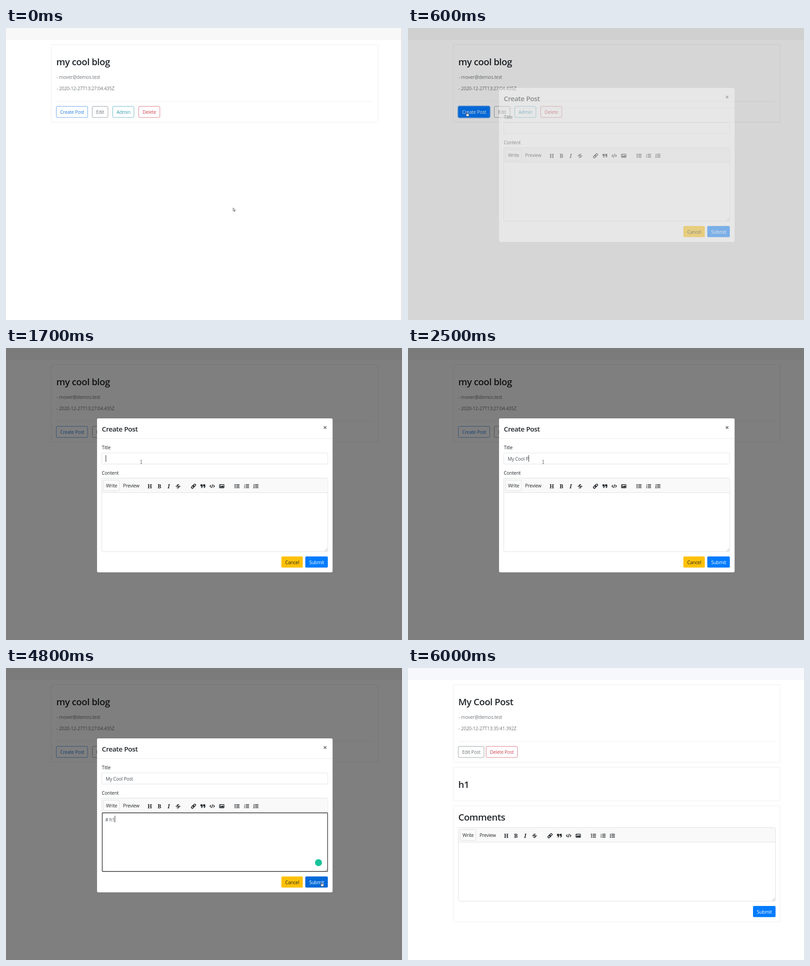
Write an HTML page that moves like this. It is 870x643 px and loops after 6.3 s.

```html
<!DOCTYPE html>
<html lang="en">
<head>
<meta charset="utf-8">
<title>Create a post</title>
<style>
html, body { margin: 0; width: 100%; height: 100%; overflow: hidden; background: #fff; }
svg { display: block; width: 870px; height: 643px; }
text { font: 10.3px "Open Sans", "Noto Sans", sans-serif; letter-spacing: -.02em; fill: #212529; white-space: pre; }
text.h2 { font-size: 20.4px; font-weight: 600; letter-spacing: -.025em; }
text.h4 { font-size: 15.2px; font-weight: 600; letter-spacing: -.03em; }
text.muted { fill: #70757a; }
text.field { fill: #495057; }
text.slab { font: bold 12px "Noto Serif", serif; letter-spacing: 0; text-anchor: middle; }
text.tiny { font-size: 4px; font-weight: bold; letter-spacing: 0; }
.line { fill: none; stroke: #212529; stroke-width: 1.5; }
</style>
</head>
<body>
<svg id="stage" viewBox="0 0 870 643" xmlns="http://www.w3.org/2000/svg"></svg>
<script>
const LOOP = 6300, STEP = 100;
const TITLE = "My Cool Post", BODY = "# h1", MAIL = "mover@demos.test";
const BLUE = "#2a80e0", GRAY = "#6f757a", TEAL = "#2f9cb0", RED = "#cf4450";

const text = (x, y, s, cls = "", extra = "") => `<text x="${x}" y="${y}" class="${cls}" ${extra}>${s}</text>`;
const box = (x, y, w, h, stroke, fill = "none", r = 1, extra = "") =>
  `<rect x="${x}" y="${y}" width="${w}" height="${h}" rx="${r}" stroke="${stroke}" fill="${fill}" ${extra}/>`;
const path = (d, attrs = 'class="line"') => `<path d="${d}" ${attrs}/>`;
const group = (id, s) => `<g id="${id}">${s}</g>`;
const card = (y, h) => box(99.5, y, 718, h, "#eee");

const outline = (x, w, label, color, id = "b") =>
  box(x, 172.5, w, 24.5, color, "none", 2.5, `id="${id}Box" stroke-opacity=".7"`) +
  text(x + 8.5, 189, label, "", `id="${id}Text" style="fill:${color}"`);

const solid = (x, y, w, label, fill, color, id = "s") =>
  box(x, y, w, 24.5, "none", fill, 2.5, `id="${id}"`) +
  text(x + 8.5, y + 17, label, "", `style="fill:${color}"`);

const rows = [-3.3, 0, 3.3];
const bars = path(rows.map(y => `M-1.8 ${y}H5.5`).join(""));

const icons = [
  [105.5, text(0, 4.4, "H", "slab")],
  [126.5, text(0, 4.4, "B", "slab")],
  [147, text(0, 4.4, "I", "slab", 'style="font-style:italic"')],
  [167.5, text(0, 4.2, "S", "slab", 'style="font-family:\'Open Sans\',sans-serif;font-size:11.5px"') + path("M-5.3 .2H5.3")],
  [201.5, `<g transform="rotate(-45)">${box(-5.8, -2, 6.8, 4, "#212529", "none", 2, 'stroke-width="1.6"')}${box(-1, -2, 6.8, 4, "#212529", "none", 2, 'stroke-width="1.6"')}</g>`],
  [222, path([-5.2, .6].map(x => `M${x + .6} -4H${x + 4}q.7 0 .7 .7V.8q0 3.2-3.4 3.2v-1.6q1.6 0 1.6-1.9H${x + .6}q-.6 0-.6-.7V-3.3q0-.7 .6-.7Z`).join(""), 'fill="#212529"')],
  [242.5, path("M-2.6 -2.6L-5 0L-2.6 2.6M2.6 -2.6L5 0L2.6 2.6M1.2 -4L-1.2 4")],
  [263.5, box(-5, -3.6, 10, 7.4, "#212529", "none", 1, 'stroke-width="1.4"') + path("M-4 2.6V1L-2.2 -.6L-.8 .7L1.8 -1.8L4 .4V2.6Z", 'fill="#212529"') + '<circle cx="-2.6" cy="-1.7" r=".9" fill="#212529"/>'],
  [297, rows.map(y => `<circle cx="-4.3" cy="${y}" r="1.2" fill="#212529"/>`).join("") + bars],
  [318, rows.map((y, i) => text(-5.4, y + 1.5, i + 1, "tiny")).join("") + bars],
  [338.5, path("M-5.4 -3.4L-4.5 -2.5L-2.8 -4.5M-5.4 0L-4.5 .9L-2.8 -1.1", 'class="line" style="stroke-width:1.1"') + '<circle cx="-4.2" cy="3.4" r="1.2" fill="#212529"/>' + bars]
];

function editor(x, y, w) {
  const r = x + w, b = y + 162;
  return box(x, y, w, 162, "#dfe0e2", "#fff", 2) +
    box(x + .5, y + .5, w - 1, 31.5, "none", "#f9f9f9") +
    path(`M${x} ${y + 32}H${r}`, 'stroke="#dfe0e2"') +
    box(x + 4, y + 4.5, 34.5, 23.5, "#dfdfdf", "#fbfbfb", 2) +
    text(x + 9.3, y + 20.5, "Write") + text(x + 46.8, y + 20.5, "Preview") +
    icons.map(([dx, s]) => `<g transform="translate(${x + dx} ${y + 17.8})">${s}</g>`).join("") +
    path(`M${r - 7} ${b - 1}l6 -6M${r - 3.5} ${b - 1}l2.5 -2.5`, 'stroke="#8a8a8a" stroke-width=".7"');
}

const heading = (title, date) => card(36.5, 171) + text(110.5, 81.5, title, "h2") +
  text(111, 112, "- " + MAIL, "muted") + text(111, 137, "- " + date, "muted") +
  path("M110.5 161.5H807", 'stroke="#f0f0f0"');

const blog = heading("my cool blog", "2020-12-27T13:27:04.435Z") +
  box(109.5, 171.5, 71, 26.5, "#80bdff", "none", 3.5, 'id="ring" stroke-width="1.6"') +
  outline(110.5, 69, "Create Post", BLUE, "create") +
  outline(189.5, 34.5, "Edit", GRAY) +
  outline(234.5, 46.5, "Admin", TEAL) +
  outline(291.5, 46.5, "Delete", RED) +
  path("M869 0V643", 'id="edge" stroke="#dcdcdc" stroke-width="1.5"');

const post = heading(TITLE, "2020-12-27T13:35:41.392Z") +
  outline(110.5, 56.5, "Edit Post", GRAY) +
  outline(171.5, 69, "Delete Post", RED) +
  card(218.5, 74) + text(110.5, 263.5, "h1", "h2") +
  card(303.5, 255.5) + text(110.5, 335.5, "Comments", "h2") +
  editor(110.5, 351.5, 697) + solid(758, 524, 49.5, "Submit", "#007bff", "#fff");

const modal = box(200, 155, 517.5, 339, "none", "#fff", 3) +
  text(210.5, 184, "Create Post", "h4") +
  path("M698.2 172.4l5.6 5.6m0 -5.6l-5.6 5.6", 'class="line" stroke-opacity=".7"') +
  path("M200 199.5H717.5", 'stroke="#e9ecef"') +
  text(210.5, 222.5, "Title") + box(210.5, 231, 496.5, 24.5, "#dfe2e5", "#fff", 2.5) +
  text(219, 248, "", "field", 'id="titleText"') +
  text(210.5, 278.5, "Content") + editor(210.5, 286.5, 496.5) +
  group("focus", box(211.5, 319, 495, 129, "#333", "none", 1, 'stroke-width="1.3"') +
    '<circle cx="686.5" cy="428.7" r="7.6" fill="#15c39a"/>') +
  text(218, 337.5, "", "field", 'id="bodyText"') +
  path("M0 0V14.5", 'id="caret" stroke="#222"') +
  solid(605, 459, 47, "Cancel", "#ffc107", "#212529") +
  solid(657.5, 459, 49.5, "Submit", "#007bff", "#fff", "submit");

const pen = 'fill="#fff" stroke="#222" stroke-width=".7" stroke-linejoin="round"';
const cursors = {
  arrow: path("M0 0V7.2L1.7 5.7L2.8 8.2L4 7.7L2.9 5.3H5Z", pen),
  hand: path("M-.2 .4Q.5 -.5 1.2 .4V3L5 3.8Q5.8 4 5.6 5L5 8.4H1L-1.8 5.2Q-1.6 4.2 -.2 5Z", pen),
  beam: path("M-1.6 -4Q0 -4 0 -3Q0 -4 1.6 -4M0 -3V3M-1.6 4Q0 4 0 3Q0 4 1.6 4", 'fill="none" stroke="#555" stroke-width=".9"')
};

const stage = document.getElementById("stage");
stage.innerHTML = '<rect width="870" height="643" fill="#fff"/><rect id="nav" width="870" height="26"/>' +
  group("blog", blog) + group("post", post) +
  '<rect id="shade" width="870" height="643"/>' + group("modal", modal) +
  group("pointer", Object.keys(cursors).map(k => group(k, cursors[k])).join(""));

const $ = id => document.getElementById(id);
const set = (id, attrs) => { for (const k in attrs) $(id).setAttribute(k, attrs[k]); };
const show = (id, on) => set(id, { display: on ? "inline" : "none" });
const clamp = v => Math.min(1, Math.max(0, v));

// time, x, y of the pointer
const track = [
  [0, 499, 396], [500, 128.5, 186], [800, 128.5, 186], [1400, 297, 251],
  [2700, 297, 251], [3000, 303, 372], [3700, 303, 372], [4200, 836, 440],
  [4600, 692.5, 472.5], [4900, 692.5, 472.5], [5800, 700, 656], [LOOP, 700, 656]
];

function pointerAt(t) {
  const i = track.findIndex(p => p[0] > t);
  const [t0, x0, y0] = track[i - 1], [t1, x1, y1] = track[i];
  const u = (t - t0) / (t1 - t0), e = u * u * (3 - 2 * u);
  return [x0 + (x1 - x0) * e, y0 + (y1 - y0) * e];
}

const inside = ([x, y], l, top, r, b) => x > l && x < r && y > top && y < b;

function draw(t) {
  const p = pointerAt(t), done = t >= 4900, open = t > 554 && !done;
  show("blog", !done);
  show("post", done);
  set("nav", { fill: done ? "#f7f8fc" : "#f8f8f8" });
  show("edge", t < 500);

  const overCreate = inside(p, 110, 172, 180, 197), active = overCreate && t < 700;
  set("createBox", { fill: active ? "#007bff" : "none" });
  $("createText").style.fill = active ? "#fff" : BLUE;
  show("ring", active && t >= 500);

  const slide = 1 - Math.pow(1 - clamp((t - 554) / 260), 1.7);
  show("shade", open);
  show("modal", open);
  set("shade", { opacity: .5 * clamp((t - 554) / 143) });
  set("modal", { opacity: clamp((t - 554) / 110), transform: `translate(0 ${Math.round(64 * (slide - 1)) / 2})` });

  const inBody = t >= 3000;
  $("titleText").textContent = TITLE.slice(0, Math.floor(clamp((t - 1700) / 1000) * TITLE.length));
  $("bodyText").textContent = BODY.slice(0, Math.floor(clamp((t - 3100) / 400) * BODY.length));
  show("focus", inBody);
  show("caret", t >= 1500);
  if (open) {
    const len = $(inBody ? "bodyText" : "titleText").getComputedTextLength();
    set("caret", { transform: inBody ? `translate(${218.5 + len} 325.5)` : `translate(${219.5 + len} 236)` });
  }

  const overSubmit = open && inside(p, 657, 459, 707, 484);
  set("submit", { fill: overSubmit ? "#0069d9" : "#007bff" });
  const overField = done ? inside(p, 111, 384, 807, 513)
    : open && (inside(p, 211, 231, 707, 256) || inside(p, 211, 319, 707, 448));
  const kind = overCreate || overSubmit ? "hand" : overField ? "beam" : "arrow";
  for (const k in cursors) show(k, k === kind);
  set("pointer", { transform: `translate(${p[0]} ${p[1]})` });
}

function tick(now) {
  draw(Math.floor(now % LOOP / STEP) * STEP);
  requestAnimationFrame(tick);
}
draw(0);
requestAnimationFrame(tick);
</script>
</body>
</html>
```
